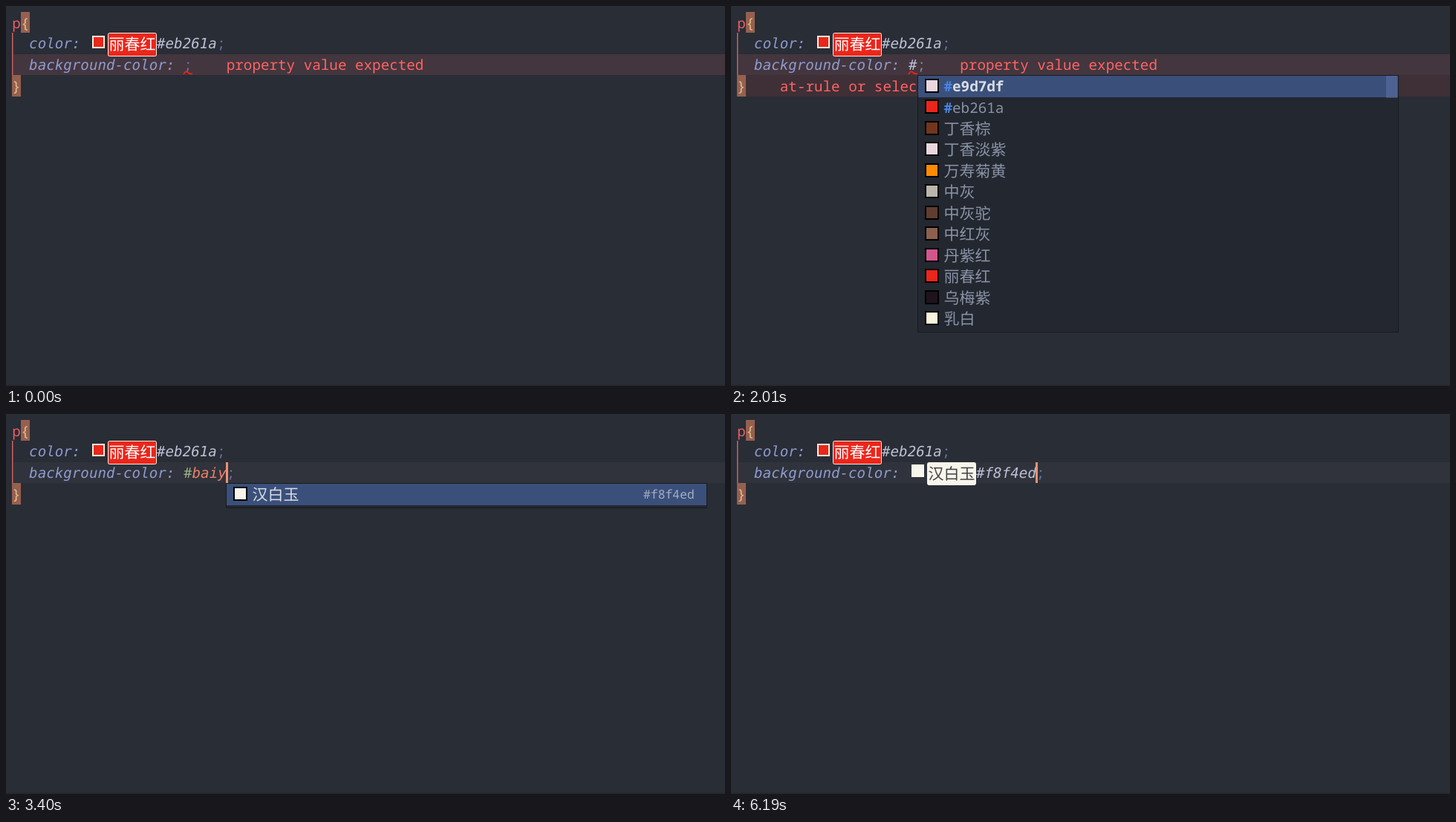
Recreate the animation shown at these times as an HTML page. Size 968x512 px, loop 6.66 s.

```html
<!DOCTYPE html>
<html lang="zh">
<head>
<meta charset="utf-8">
<title>Colour completion</title>
<style>
html, body { margin: 0; width: 100%; height: 100%; overflow: hidden; background: #292d35; }
svg { display: block; width: 968px; height: 512px; }
text { font: 500 19.25px "Noto Sans Mono", "DejaVu Sans Mono", monospace; white-space: pre; text-rendering: geometricPrecision; }
.cjk { font: 300 21px "Noto Sans CJK SC", "Noto Sans CJK", sans-serif; }
.it { font: italic 19.18px "DejaVu Sans Mono", monospace; }
.bold { font-weight: 600; }
.small { font-size: 16.4px; }
</style>
</head>
<body>
<svg id="stage" viewBox="0 0 968 512"></svg>
<script>
const LOOP = 6660, CH = 11.55, ROW = 28.5, VALUE_X = 239;
const stage = document.getElementById('stage');

const ink = {
  prop: '#8e9bd0', value: '#bcc0d6', semi: '#6472a4', error: '#ff6464',
  brace: '#e2bd8c', tag: '#e85f66', hash: '#9db58a', word: '#ee8068', hex: '#56b6c2'
};

// Completion lists: visible rows "label colour", thumb height, matched letters
const lists = {
  hash: { thumb: 30, match: '#', rows: [
    '#e9d7df #e9d7df', '#eb261a #eb261a', '丁香棕 #71361d', '丁香淡紫 #e9d7df',
    '万寿菊黄 #fb8b05', '中灰 #bbb5ac', '中灰驼 #603d30', '中红灰 #8b614d',
    '丹紫红 #d2568c', '丽春红 #eb261a', '乌梅紫 #1e131d', '乳白 #f9f4dc'] },
  b: { thumb: 83, match: '#b', rows: [
    '#eb261a #eb3a1a', '碧青 #5cb3cc', '冰山蓝 #a4aca7', '北瓜黄 #fc7a23',
    '宝石绿 #41ae3c', '宝石蓝 #2486b9', '扁豆紫 #a35c8f', '报春红 #ec8aa4',
    '斑鸠灰 #482936', '柏林蓝 #126bae', '槟榔综 #c1651a', '白芨红 #de7897'] },
  ba: { thumb: 120, match: '#', rows: [
    '宝石绿 #41ae3c', '宝石蓝 #2486b9', '报春红 #ec8aa4', '斑鸠灰 #482936',
    '白芨红 #de7897', '白屈菜红 #f0945d', '百灵鸟灰 #b4a992', '豹皮黄 #daa45a',
    '扁豆紫 #a35c8f', '冰山蓝 #a4aca7', '柏林蓝 #126bae', '槟榔综 #c1651a'] },
  bai: { thumb: 250, match: '#', rows: [
    '白芨红 #de7897', '白屈菜红 #f0945d', '百灵鸟灰 #b4a992', '粉白 #fbf2e3',
    '荔肉白 #f2e6ce', '乳白 #f9f4dc', '象牙白 #fffef8', '银白 #f1f0ed',
    '鱼肚白 #f7f4ed', '月白 #eef7f2', '云峰白 #d8e3e7', '汉白玉 #f8f4ed'] },
  jade: { thumb: 0, match: '#', rows: ['汉白玉 #f8f4ed'] }
};

// at: start ms, text: typed value, caret, list, err: failing lines, deco: 1 label, 2 label and swatch
const steps = [];
function step(at, change) {
  steps.push({ ...steps[steps.length - 1], ...change, at });
}
step(0, { text: '', caret: 0, list: '', err: 1, deco: 0 });
step(330, { caret: 1 });
step(810, { caret: 0 });
step(1280, { caret: 1 });
step(1540, { text: '#' });
step(1610, { list: 'hash' });
step(1740, { err: 2 });
step(2010, { caret: 0 });
step(2340, { text: '#b', caret: 1 });
step(2410, { list: 'b', err: 0 });
step(2470, { text: '#ba', list: 'ba' });
step(2670, { text: '#bai', list: 'bai' });
step(3130, { caret: 0 });
step(3400, { text: '#baiy', list: 'jade', caret: 1 });
step(3600, { text: '#baiyu' });
step(4060, { caret: 0 });
step(4190, { text: '#f8f4ed', list: '', caret: 1 });
step(4280, { deco: 1 });
step(4670, { caret: 0 });
step(5200, { caret: 1, deco: 2 });
step(5660, { caret: 0 });
step(6190, { caret: 1 });

const rect = (x, y, w, h, fill, more = '') =>
  `<rect x="${x}" y="${y}" width="${w}" height="${h}" fill="${fill}" ${more}/>`;
const text = (x, y, s, fill, cls = '') =>
  `<text x="${x}" y="${y}" fill="${fill}" class="${cls}">${s}</text>`;

function swatch(x, y, size, fill, edge) {
  return rect(x, y, size, size, edge) + rect(x + 2, y + 2, size - 4, size - 4, fill);
}

function label(x, y, h, name, fill, edge, color) {
  return rect(x + .5, y + .5, 65, h - 1, fill, `rx="2" stroke="${edge}"`) +
    text(x + 1.5, y + 23, name, color, 'cjk');
}

function popup(name, left) {
  const { rows, thumb, match } = lists[name];
  const h = Math.round(rows.length * ROW + 5);
  let out = rect(left + .5, 93.5, 647, h - 1, '#23272f', 'stroke="#181b20"') +
    rect(left + 1, 94, 646, 29, '#3a507a');
  if (thumb) {
    out += rect(left + 631, 94, 15, thumb, '#5f6a93', 'opacity=".42"') +
      rect(left + 631, 94, 15, 29, '#4d6293');
  }
  rows.forEach((row, i) => {
    const [item, color] = row.split(' ');
    const y = 115 + i * ROW, first = i === 0;
    const fill = first ? '#d9dde6' : '#8a93a8';
    out += swatch(left + 10, Math.round(97.6 + i * ROW), 19, color, '#000');
    if (item[0] === '#') {
      const letters = [...item].map(c => match.includes(c)
        ? `<tspan fill="#4a86e8" class="bold">${c}</tspan>` : c).join('');
      out += text(left + 35.5, y, letters, fill, first ? 'bold' : '');
    } else {
      out += text(left + 35.5, y + .5, item, fill, 'cjk');
      if (first) out += text(left + 562, 114, color, '#a3adc4', 'small');
    }
  });
  return out;
}

function typed(s, x) {
  if (s.deco || s.text.length < 2) return text(x, 86, s.text, ink.value, 'it');
  if (s.text === '#f8f4ed') return text(x, 86, s.text, ink.hex);
  return text(x, 86, '#', ink.hash) + text(x + CH, 86, s.text.slice(1), ink.word, 'it');
}

function draw(s) {
  const shift = [0, 66, 91][s.deco];
  const end = VALUE_X + shift + s.text.length * CH;
  let out = rect(0, 0, 968, 512, '#292d35') + rect(0, 510, 968, 2, '#24282f');

  out += rect(10, 65, 958, 28, s.err ? '#44363e' : '#30333b');
  if (s.err > 1) out += rect(8, 93, 960, 29, '#3f2f36');
  out += rect(8, 36, 1.5, 57, '#cc625e');
  out += rect(20, 8, 12, 28, '#95604f') + rect(8, 93, 12, 29, '#95604f');

  out += text(8.2, 29.5, 'p', ink.tag) + text(20, 29.5, '{', ink.brace) + text(8, 114.5, '}', ink.brace);
  out += text(31.1, 57, 'color:', ink.prop, 'it') +
    swatch(116, 40, 17, '#eb261a', '#f4efdc') +
    label(137, 36, 32, '丽春红', '#eb261a', '#f3eee8', '#fff') +
    text(203, 57, '#eb261a', ink.value, 'it') + text(203 + 7 * CH, 57, ';', ink.semi);

  out += text(31.1, 86, 'background-color:', ink.prop, 'it');
  if (s.deco > 1) out += rect(243, 68, 17, 17, '#f8f5ea');
  if (s.deco) out += label(VALUE_X + shift - 66, 65, 31, '汉白玉', '#f8f5ec', '#f8f5ec', '#444');
  out += typed(s, VALUE_X + shift);
  out += text(end, 86, ';', s.text === '#' ? '#8b8792' : ink.semi);

  if (s.err) {
    out += text(end + CH * 5, 86, 'property value expected', ink.error) +
      '<path d="M239 92Q242 86.5 245 89.5T251 91" fill="none" stroke="#e8231c" stroke-width="1.8"/>';
  }
  if (s.err > 1) out += text(65.8, 114.5, 'at-rule or selector expected', ink.error);
  if (s.list) {
    const n = s.list === 'hash' ? 1 : s.text.length;
    out += popup(s.list, Math.floor(239.7 + 11.4 * n));
  }
  if (s.caret) out += rect(Math.round(end - .9), 65, 3, 28, '#f08f73');
  stage.innerHTML = out;
}

let shown;
const start = performance.now();
function tick() {
  const t = (performance.now() - start) % LOOP;
  const now = steps.filter(s => s.at <= t).pop();
  if (now !== shown) draw(shown = now);
  requestAnimationFrame(tick);
}
tick();
</script>
</body>
</html>
```
